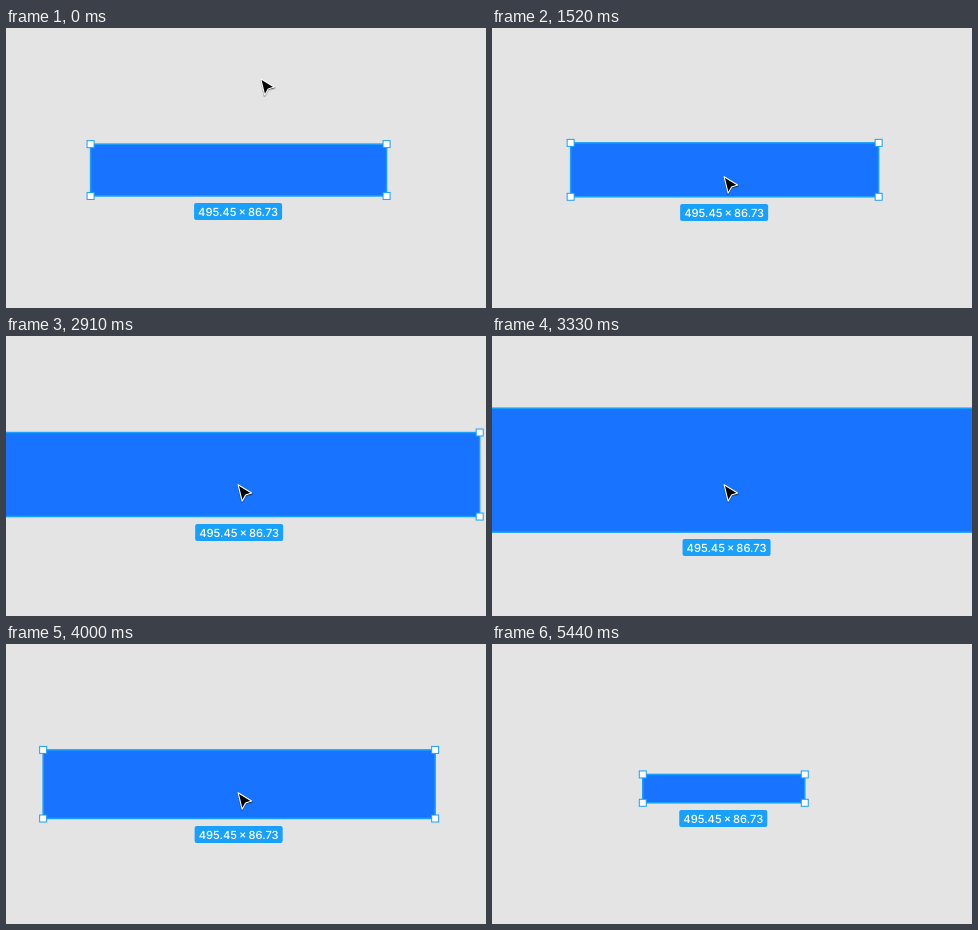
An HTML page for the animation above (6210 ms loop, 480 by 280 pixels).

```html
<!DOCTYPE html>
<html lang="en">
<head>
<meta charset="utf-8">
<title>Zooming a selected rectangle</title>
<style>
  html, body { margin: 0; width: 100%; height: 100%; overflow: hidden; background: #e4e4e4; }
  svg { display: block; }
  text {
    font: 500 11.2px Inter, "Liberation Sans", sans-serif;
    word-spacing: -1px;
    text-rendering: geometricPrecision;
    text-anchor: middle;
    fill: #fff;
  }
  .handle { fill: #fff; stroke: #18a0fb; }
</style>
</head>
<body>
<svg width="480" height="280" viewBox="0 0 480 280">
  <rect id="box" fill="#1874ff" stroke="#18a0fb" stroke-width="1.5"/>
  <g id="handles">
    <rect class="handle" width="7" height="7"/>
    <rect class="handle" width="7" height="7"/>
    <rect class="handle" width="7" height="7"/>
    <rect class="handle" width="7" height="7"/>
  </g>
  <g id="badge">
    <rect x="-44" width="88" height="17" rx="2" fill="#18a0fb"/>
    <text y="12.7">495.45 × 86.73</text>
  </g>
  <g id="cursor" stroke-linejoin="round">
    <path d="M.3 1 13.5 9 7 10.8 3.6 17Z" stroke="#000" stroke-opacity=".2" stroke-width="2.5"/>
    <path d="M-.3 -.3 13.2 8 7.2 10 3.7 16.2Z" stroke="#fff" stroke-width="1.1"/>
  </g>
</svg>
<script>
const LOOP = 6210;
const TICK = 60; // typical time between two steps of a move
const ASPECT = 86.73 / 495.45;

// Moves: first step, last step, value reached.
const zooms = [
  [1520, 1520, 308], [1750, 1930, 335], [2110, 2220, 347], [2430, 2430, 361.5],
  [2480, 2510, 417], [2880, 2910, 480], [3210, 3330, 708],
  [3890, 4000, 392], [4360, 4410, 278.5], [4790, 5050, 162]
];
const paths = [
  [60, 670, 229, 128], [730, 1040, 232.4, 149], [5350, 5440, 580, 360]
];

// Each move runs in equal ratios, one per step.
function valuesAt(time, initial, moves) {
  return moves.reduce((now, [start, end, ...goal]) => {
    if (time < start) return now;
    const gaps = Math.round((end - start) / TICK);
    const passed = time < end ? Math.floor((time - start) / (end - start) * gaps) : gaps;
    const done = (passed + 1) / (gaps + 1);
    return now.map((v, i) => v * (goal[i] / v) ** done);
  }, initial);
}

const [box, handles, badge, cursor] =
  ["box", "handles", "badge", "cursor"].map(id => document.getElementById(id));

function set(el, attrs) {
  for (const name in attrs) el.setAttribute(name, attrs[name]);
}

function move(el, x, y) {
  el.setAttribute("transform", `translate(${x} ${y})`);
}

function draw(time) {
  const [width] = valuesAt(time, [296], zooms);
  const height = width * ASPECT;
  // The box grows around a point just off its centre.
  const cx = 230.8 + width * 0.006;
  const cy = 147.7 - width * 0.0191;
  const x = cx - width / 2;
  const y = cy - height / 2;
  set(box, { x, y, width, height });
  [...handles.children].forEach((handle, i) => set(handle, {
    x: x + (i % 2) * width - 3.5,
    y: y + (i >> 1) * height - 3.5
  }));
  move(badge, cx - 0.5, Math.round(y + height + 7));
  move(cursor, ...valuesAt(time, [255, 51], paths));
}

const begin = performance.now();
function frame() {
  draw((performance.now() - begin) % LOOP);
  requestAnimationFrame(frame);
}
frame();
</script>
</body>
</html>
```
